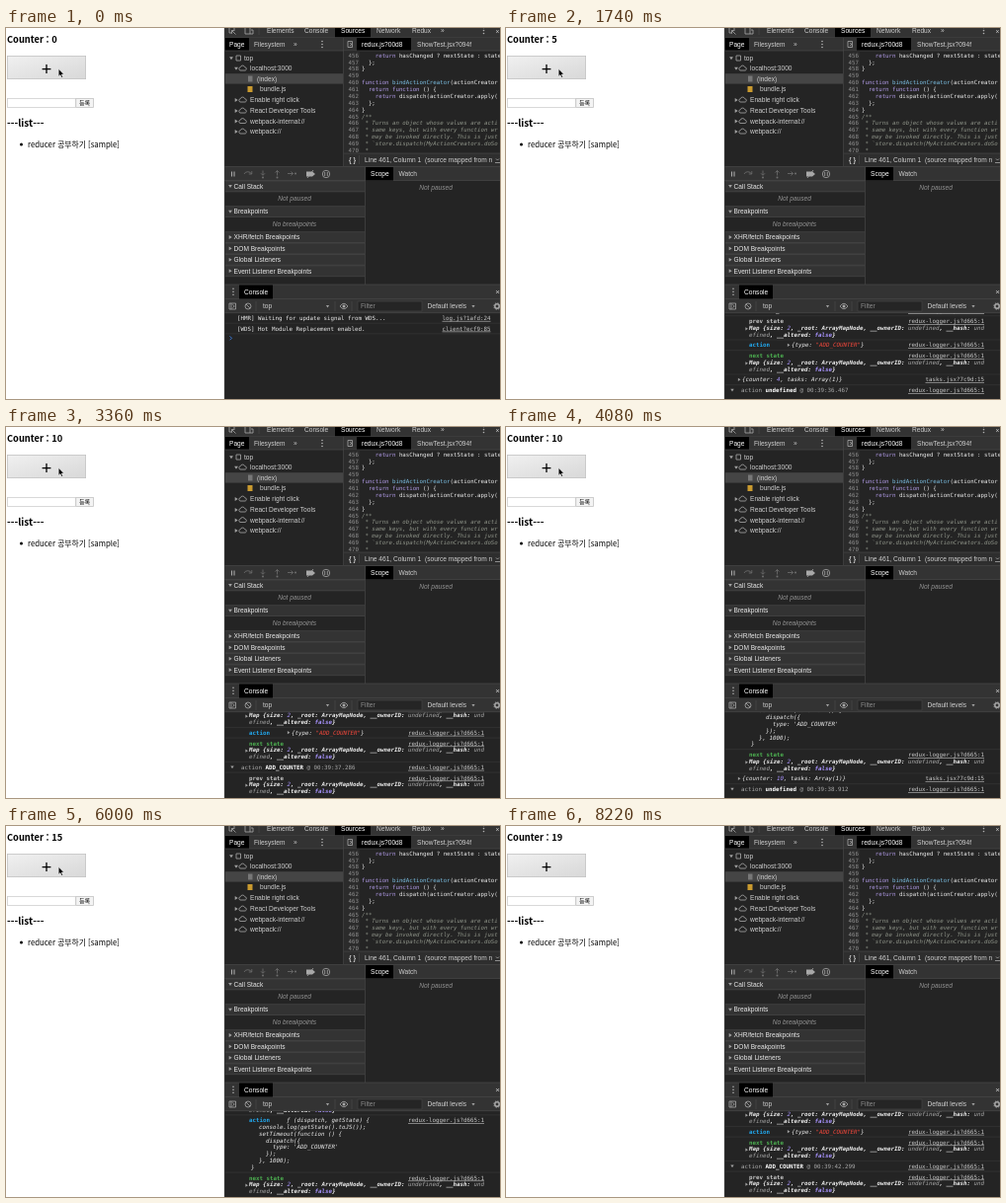
Animation, 500 px wide and 376 px high, one loop 8.28 s. Source, as an HTML page:

```html
<!DOCTYPE html>
<html lang="ko">
<head>
<meta charset="utf-8">
<title>Counter</title>
<style>
html, body { margin: 0; width: 100%; height: 100%; overflow: hidden; background: #fff; }
svg { display: block; width: 100vw; height: 100vh; }
text { white-space: pre; }
.page { font-family: "Noto Sans CJK KR", "Noto Sans CJK", "Noto Sans", sans-serif; fill: #000; }
.ui { font: 6.6px "Liberation Sans", Arial, sans-serif; fill: #cecece; }
.mono { font: 5.82px "DejaVu Sans Mono", monospace; fill: #ececec; }
.code { font-size: 5.72px; }
.i { font-style: italic; }
.b { font-weight: 700; }
.icon { fill: none; stroke: #a8a8a8; stroke-width: .8; }
.dim { stroke: #707070; }
</style>
</head>
<body>
<svg id="stage" viewBox="0 0 500 376" preserveAspectRatio="none"></svg>
<script>
const LOOP = 8280, ADD_DELAY = 840, CONSOLE_LAG = 60;
const LINE = 6.8, ROW = 10.7;

const esc = s => String(s).replace(/&/g, '&amp;').replace(/</g, '&lt;');
const rect = (x, y, w, h, fill, extra = '') =>
  `<rect x="${x}" y="${y}" width="${w}" height="${h}" fill="${fill}" ${extra}/>`;
const icon = (d, cls = '', extra = '') => `<path class="icon ${cls}" d="${d}" ${extra}/>`;
const line = (x1, y1, x2, y2, color = '#484848') =>
  `<path d="M${x1} ${y1}L${x2} ${y2}" stroke="${color}" stroke-width=".7"/>`;
const text = (x, y, s, cls = 'ui', extra = '') =>
  `<text x="${x}" y="${y}" class="${cls}" ${extra}>${esc(s)}</text>`;
const white = 'style="fill:#fff"';
const mid = 'text-anchor="middle"';
const arrow = (x, y, open, r = 1.9) =>
  `<path fill="#a0a0a0" d="${open
    ? `M${x - r} ${y - r * .7}h${2 * r}l${-r} ${r * 1.6}z`
    : `M${x - r * .7} ${y - r}v${2 * r}l${r * 1.6} ${-r}z`}"/>`;
const dots = (x, y) => [-3, 0, 3].map(d => `<circle cx="${x}" cy="${y + d}" r=".8" fill="#b0b0b0"/>`).join('');

// Coloured runs: plain strings or [colour, string, weight].
const runs = parts => parts.map(p => typeof p === 'string' ? esc(p)
  : `<tspan style="fill:${p[0]};font-weight:${p[2] || 400}">${esc(p[1])}</tspan>`).join('');
const mono = (x, y, parts, cls = '') =>
  `<text x="${x}" y="${y + 2.1}" class="mono ${cls}">${runs(parts)}</text>`;
const link = (x, y, s) =>
  `<text x="${x}" y="${y + 2.1}" class="mono" text-anchor="end" text-decoration="underline" style="fill:#c8c8c8">${s}</text>`;

function drawPage() {
  return rect(0, 0, 500, 376, '#fff')
    + '<text id="count" class="page b" x="1" y="15" font-size="9.3"></text>'
    + rect(1.4, 28.4, 79.2, 23.2, 'url(#buttonFill)', 'stroke="#c2c2c2" stroke-width=".8"')
    + text(41, 48, '+', '', mid + ' font-family="Liberation Sans, sans-serif" font-size="18"')
    + rect(1.4, 71.4, 69, 9, '#fff', 'stroke="#cfcfcf" stroke-width=".8"')
    + rect(70.8, 71.4, 17.6, 9, '#f4f4f4', 'stroke="#c4c4c4" stroke-width=".8"')
    + text(79.6, 78.3, '등록', 'page', mid + ' font-size="6.2"')
    + text(1, 99.5, '---list---', 'page b', 'font-size="10"')
    + '<circle cx="15.5" cy="118" r="1.5"/>'
    + text(22, 120.8, 'reducer 공부하기 [sample]', 'page', 'font-size="7.8"')
    + '<path id="cursor" d="M53.2 41.500v7.600l1.800-1.600 1.200 2.800 1.300-.6-1.200-2.700h2.300z" stroke="#fff" stroke-width=".5"/>';
}

function drawTabs() {
  const labels = [['Elements', 264], ['Console', 302], ['Sources', 339], ['Network', 375], ['Redux', 411]];
  return rect(221, 0, 279, 9.5, '#333') + rect(333, 0, 36, 9.5, '#000')
    + icon('M226 0v5h3M231 0v2M228.500 2.500l4 4M228.500 2.500v3M228.500 2.500h3M242 0v6h5v-6M248 2h2v4h-3')
    + line(256, 0, 256, 7)
    + labels.map(([s, x]) => text(x, 5.2, s, 'ui', s === 'Sources' ? white : '')).join('')
    + text(440, 5.2, '»') + dots(483.5, 2.5) + text(495.5, 5.5, '×')
    + line(221, 9.7, 500, 9.7)
    + rect(221, 10, 279, 13, '#333')
    + rect(222, 10, 24, 13, '#000') + text(226, 19, 'Page', 'ui', white)
    + text(251, 19, 'Filesystem') + text(291, 19, '»') + dots(320, 16.5)
    + icon('M346 13.500h4.500v6h-4.500zM348 15l2 1.500-2 1.500')
    + rect(355, 10, 55, 13, '#000') + text(360, 19, 'redux.js?00d8', 'ui', white)
    + text(416, 19, 'ShowTest.jsx?094f')
    + line(221, 23, 500, 23);
}

function drawTree() {
  const cloud = y => icon(`M237 ${y + 2}a1.700 1.700 0 0 1 .3-3.300a2.300 2.300 0 0 1 4.400 0a1.700 1.700 0 0 1 .5 3.300z`);
  const hosts = [['localhost:3000', 41, true], ['Enable right click', 73], ['React Developer Tools', 84],
    ['webpack-internal://', 94.5], ['webpack://', 105]];
  return rect(222, 46.2, 119, 10.4, '#454545')
    + arrow(228, 30.5, true) + icon('M233 28h4.500v5h-4.500z') + text(241, 32.8, 'top')
    + hosts.map(([s, y, open]) => arrow(233, y, open) + cloud(y) + text(247, y + 2.3, s)).join('')
    + rect(245, 48.5, 4.5, 6, '#777') + text(254, 53.6, '(index)')
    + rect(244.5, 59, 5, 6, '#c99a2e') + text(257, 64.3, 'bundle.js');
}

function drawCode() {
  const key = s => ['#b09ae6', s], note = s => [['#8f9489', s]];
  const source = [
    ['    ', key('return'), ' hasChanged ? nextState : state;'],
    ['  };'], ['}'], [],
    [key('function'), ' ', ['#7cc0e4', 'bindActionCreator'], '(actionCreator'],
    ['  ', key('return function'), ' () {'],
    ['    ', key('return'), ' dispatch(actionCreator.apply('],
    ['  };'], ['}'],
    note('/**'),
    note(' * Turns an object whose values are acti'),
    note(' * same keys, but with every function wr'),
    note(' * may be invoked directly. This is just'),
    note(' * `store.dispatch(MyActionCreators.doSo'),
    note(' *')
  ];
  const firstNote = 9;
  return line(341.5, 10, 341.5, 140)
    + '<g clip-path="url(#codeBox)">' + rect(342, 23, 16, 104, '#2b2b2b')
    + source.map((s, i) => {
      const y = 27.6 + i * 6.87;
      return mono(346.5, y, [['#8e8e8e', String(456 + i)]], 'code')
        + mono(360, y, s, i < firstNote ? 'code' : 'code i');
    }).join('') + '</g>'
    + rect(342, 127, 158, 13.5, '#2e2e2e') + line(342, 127, 500, 127)
    + text(347, 135.6, '{ }', 'ui b') + line(357.5, 129, 357.5, 138)
    + text(363, 135.6, 'Line 461, Column 1') + text(424, 135.6, '(source mapped from n')
    + icon('M495 136.500h5M496 132.500l1.500 1.500 1.500-1.500');
}

function drawDebugger() {
  const section = (y, s, open) => rect(222, y - 5.3, 141, 10.8, '#333')
    + line(222, y - 5.3, 363, y - 5.3) + line(222, y + 5.5, 363, y + 5.5)
    + arrow(227, y, open) + text(230.5, y + 2.3, s, 'ui', 'style="fill:#e8e8e8"');
  const hint = (x, y, s) => text(x, y + 2.3, s, 'ui i', mid + ' style="fill:#929292"');
  return rect(221, 140.5, 279, 14, '#333') + line(221, 140.5, 500, 140.5) + line(221, 154.5, 500, 154.5)
    + icon('M228.500 145.500v5M231 145.500v5', '', 'style="stroke-width:1.100"')
    + icon('M241 148a4 3.500 0 0 1 7.500 0M248.800 145v3h-3M260 144.500v4.500M258 147.300l2 2 2-2M274.500 149.500v-5M272.500 146.500l2-2 2 2M285 147.500h5.500M288.500 145.500l2 2-2 2', 'dim')
    + '<g fill="#707070"><circle cx="260" cy="151.500" r="1"/><circle cx="274.500" cy="151.500" r="1"/><circle cx="293" cy="147.500" r="1"/></g>'
    + '<path d="M304 145.500h6l3 2.500-3 2.500h-6z" fill="#a8a8a8"/>' + icon('M305 152l6-8')
    + '<circle class="icon" cx="324" cy="148" r="3.700"/>' + icon('M322.700 146v4M325.300 146v4')
    + rect(364, 141, 28, 13.5, '#000') + text(369, 150.3, 'Scope', 'ui', white) + text(397.5, 150.3, 'Watch')
    + line(363.5, 140.5, 363.5, 260)
    + section(160.3, 'Call Stack', true) + hint(292, 173, 'Not paused') + hint(435, 162, 'Not paused')
    + section(186, 'Breakpoints', true) + hint(292, 199, 'No breakpoints')
    + ['XHR/fetch Breakpoints', 'DOM Breakpoints', 'Global Listeners', 'Event Listener Breakpoints']
      .map((s, i) => section(212 + i * 11.4, s, false)).join('');
}

function drawDrawer() {
  return rect(221, 260, 279, 29, '#333') + line(221, 260, 500, 260) + line(221, 274.5, 500, 274.5)
    + line(221, 288.7, 500, 288.7)
    + dots(230, 267.3) + rect(236, 260.5, 34, 14, '#000') + text(241, 269.8, 'Console', 'ui', white)
    + text(495.3, 270, '×', 'ui', 'style="font-size:8px"')
    + icon('M226 279h6.500v6h-6.500zM228 279v6M229.500 280.500l1.800 1.500-1.800 1.500')
    + '<circle class="icon" cx="245" cy="282" r="3"/>' + icon('M243 280l4 4')
    + line(253, 277, 253, 287) + text(260, 284.3, 'top') + arrow(325.5, 282, true, 1.6) + line(333, 277, 333, 287)
    + icon('M338 282q4-5.500 8 0q-4 5.500-8 0z') + '<circle cx="342" cy="282" r="1.500" fill="#a8a8a8"/>'
    + line(350, 277, 350, 287)
    + rect(356, 277, 65, 10, '#252525', 'stroke="#484848" stroke-width=".6"')
    + text(359, 284.3, 'Filter', 'ui', 'style="fill:#8c8c8c"')
    + text(426.5, 284.3, 'Default levels') + arrow(473, 282, true, 1.6)
    + '<circle class="icon" cx="497" cy="282" r="2.200" style="stroke-width:1.500"/>'
    + '<circle class="icon" cx="497" cy="282" r="3.300" stroke-dasharray="1.300 1.300"/>';
}

const GREY = '#a8a8a8', PURPLE = '#a994ff', RED = '#f5483c', LOGGER = 'redux-logger.js?d665:1';

// A message knows its line count and how to draw itself around the centre of its first line.
const message = (lines, draw) => ({ lines, height: ROW + (lines - 1) * LINE, draw });

const plain = (s, where) => message(1, y => mono(234, y, [s]) + link(490.5, y, where));

const counterLog = n => message(1, y => arrow(236, y, false, 1.6)
  + mono(239, y, ['{counter: ', [PURPLE, n], ', tasks: Array(1)}'], 'i') + link(484, y, 'tasks.jsx?7c9d:15'));

const header = (name, stamp) => message(1, y => arrow(229, y, true, 1.7)
  + mono(238, y, [[GREY, 'action '], ['#fff', name, 700], [GREY, ` @ 00:39:${(stamp / 1000).toFixed(3)}`]])
  + link(484, y, LOGGER));

const state = (label, color) => message(3, y => mono(246, y, [[color, label, 700]]) + link(484, y, LOGGER)
  + arrow(243.5, y + LINE + 1, false, 1.6)
  + mono(246, y + LINE, ['Map {size: ', [PURPLE, '2'], ', _root: ArrayMapNode, __ownerID: ',
    [GREY, 'undefined'], ', __hash: ', [GREY, 'und']], 'i b')
  + mono(246, y + 2 * LINE, [[GREY, 'efined'], ', __altered: ', [PURPLE, 'false', 700], '}'], 'i b'));

const actionLabel = y => mono(246, y, [['#22a8ee', 'action', 700]]) + link(484, y, LOGGER);

const addAction = () => message(1, y => actionLabel(y) + arrow(286, y, false, 1.6)
  + mono(289, y, ['{type: ', [RED, '"ADD_COUNTER"'], '}'], 'i'));

const thunkAction = () => message(8, y => actionLabel(y) + [
  [284, 'ƒ (dispatch, getState) {'], [256, 'console.log(getState().toJS());'],
  [256, 'setTimeout(function () {'], [263, 'dispatch({'], [270, "type: 'ADD_COUNTER'"],
  [263, '});'], [256, '}, 1000);'], [248, '}']
].map(([x, s], i) => mono(x, y + i * LINE, [s], 'i')).join(''));

const group = (name, stamp, action) =>
  [header(name, stamp), state('prev state', '#c4c4c4'), action, state('next state', '#4caf50')];

const bursts = [
  { start: 240, count: 10, stamp: 34903, step: 173.8 },
  { start: 3530, count: 5, stamp: 38372, step: 180 },
  { start: 5870, count: 4, stamp: 40958, step: 174 }
];

const events = bursts.flatMap(b => Array.from({ length: b.count }, (_, k) => {
  const at = b.start + k * 160, stamp = b.stamp + k * b.step;
  return [
    { kind: 'click', at, stamp, first: k === 0 },
    { kind: 'add', at: at + ADD_DELAY, stamp: stamp + 993, last: k === b.count - 1 }
  ];
}).flat()).sort((a, b) => a.at - b.at);

const log = [plain('[HMR] Waiting for update signal from WDS...', 'log.js?1afd:24'),
  plain('[WDS] Hot Module Replacement enabled.', 'client?ecf9:85')];

// Each event records the last message in sight and the height of that message's last line.
// A burst comes to rest one group above the end of the log.
let added = 0, previousHead = 0;
for (const e of events) {
  if (e.kind === 'click') log.push(counterLog(added));
  else added++;
  const head = log.length;
  log.push(...(e.kind === 'click'
    ? group('undefined', e.stamp, thunkAction())
    : group('ADD_COUNTER', e.stamp, addAction())));
  e.end = e.last ? previousHead + 1 : e.first ? log.length - 1 : head;
  e.bottom = e.first ? 370 : e.kind === 'click' ? 367 : 369;
  previousHead = head;
}

function drawConsole(e) {
  const { end, bottom } = e || { end: 1, bottom: 304.5 };
  let out = e ? '' : icon('M226.500 312.300l2 2-2 2', '', 'style="stroke:#3f8cff"') + line(222, 309.8, 500, 309.8, '#363636');
  let y = bottom - (log[end].lines - 1) * LINE;
  for (let i = end; i >= 0 && y > 220; i--) {
    out += log[i].draw(y) + line(222, y - 5.3, 500, y - 5.3, '#363636');
    if (i) y -= log[i - 1].height;
  }
  return out;
}

document.getElementById('stage').innerHTML =
  '<defs><clipPath id="codeBox"><path d="M342 23.500H500V126.500H342z"/></clipPath>'
  + '<clipPath id="logBox"><path d="M221 289H500V376H221z"/></clipPath>'
  + '<linearGradient id="buttonFill" x2="1" y2="1"><stop stop-color="#f0f0f0"/><stop offset="1" stop-color="#d8d8d8"/></linearGradient></defs>'
  + drawPage() + rect(221, 0, 279, 376, '#242424')
  + drawTabs() + drawTree() + drawCode() + drawDebugger() + drawDrawer()
  + '<g clip-path="url(#logBox)"><g id="log"></g></g>' + line(221.3, 0, 221.3, 376, '#444');

const countNode = document.getElementById('count');
const cursorNode = document.getElementById('cursor');
const logNode = document.getElementById('log');
let shown;

function render(t) {
  countNode.textContent = 'Counter : ' + events.filter(e => e.kind === 'add' && e.at <= t).length;
  cursorNode.style.display = t < 7900 ? '' : 'none';
  const latest = events.filter(e => e.at + CONSOLE_LAG <= t).pop() || null;
  if (latest !== shown) logNode.innerHTML = drawConsole(shown = latest);
}

const began = performance.now();
function tick() {
  render((performance.now() - began) % LOOP);
  requestAnimationFrame(tick);
}
tick();
</script>
</body>
</html>
```
